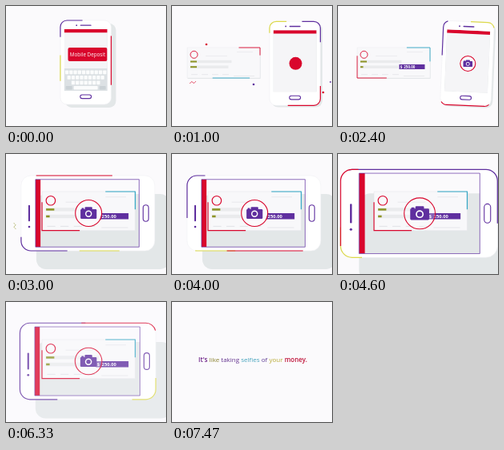
An HTML page with a canvas for the animation above (7.54 s loop, 200x150 px).

```html
<!DOCTYPE html>
<html lang="en">
<head>
<meta charset="utf-8">
<title>Mobile Deposit</title>
<style>
html, body { margin: 0; width: 100%; height: 100%; overflow: hidden; background: #fbfafc; }
canvas { display: block; width: 200px; height: 150px; }
</style>
</head>
<body>
<canvas id="stage"></canvas>
<script>
const LOOP = 7540, FPS = 15;
const BG = '#fbfafc', RED = '#d9062c', PURPLE = '#5f2f9f', YELLOW = '#dcd94a',
      TEAL = '#2fa5c4', OLIVE = '#8d9426', SHADE = '#e3e7e8', LINE = '#e4e4e8';
const FONT = '"Open Sans", "Noto Sans", sans-serif';

const canvas = document.getElementById('stage');
const ctx = canvas.getContext('2d');
const dpr = window.devicePixelRatio || 1;
canvas.width = 200 * dpr;
canvas.height = 150 * dpr;

const clamp = v => Math.min(1, Math.max(0, v));
const mix = (a, b, k) => a + (b - a) * k;
const part = (t, a, b) => clamp((t - a) / (b - a));
const ramp = (t, a, b) => { const k = part(t, a, b); return k * k * (3 - 2 * k); };
const glide = (t, a, b) => 1 - (1 - part(t, a, b)) ** 3;
const bump = (t, a, b) => Math.sin(Math.PI * part(t, a, b));

// Phone poses: top and end are the bezels, dx and dy the shadow offset.
const HOME = { x: 99.7, y: 70.5, len: 105, wid: 63.5, top: 11, end: 17, dx: 6, dy: 4, lens: 8, turn: 0 };
const SIDE = { ...HOME, x: 161.5, y: 72, dx: 2, dy: 2, lens: 9.5 };
const FLAT = { x: 102.4, y: 74, len: 167, wid: 94, top: 18, end: 19.5, dx: 19, dy: 23, lens: 16.5, turn: -Math.PI / 2 };
const NEAR = { ...FLAT, x: 101.3, y: 74.3, len: 196, wid: 110, top: 23, end: 22, dx: 23, dy: 30, lens: 19.4 };

function blend(a, b, k) {
  const out = {};
  for (const key in a) out[key] = mix(a[key], b[key], k);
  return out;
}
const flatness = t => ramp(t, 2.45, 2.97);
const nearness = t => ramp(t, 4.05, 4.55) - ramp(t, 5.7, 6.4);

function poseAt(t) {
  let p = blend(HOME, SIDE, ramp(t, .3, 1.2));
  p = blend(p, FLAT, flatness(t));
  p = blend(p, NEAR, nearness(t));
  p.turn += .05 * bump(t, 2.1, 2.55);
  return p;
}

// Where each coloured stroke starts on the phone outline, clockwise, at each beat.
const BEATS = [0, 1, 2.4, 3, 4.6, 5.6, 6.6];
const STROKES = [
  [PURPLE, -.08, .1, .85, .87, 1.17, 1.68, 2],
  [YELLOW, .75, .94, 1.08, 1.74, 1.94, 2.43, 2.7],
  [RED, .22, .41, .48, 1.19, 2, 2.11, 2.4]
];
function along(t, stops) {
  let i = 0;
  while (i < BEATS.length - 2 && t > BEATS[i + 1]) i++;
  return mix(stops[i], stops[i + 1], part(t, BEATS[i], BEATS[i + 1]));
}

function box(x, y, w, h, r, fill) {
  ctx.beginPath();
  ctx.roundRect(x, y, w, h, r);
  if (fill) { ctx.fillStyle = fill; ctx.fill(); }
}
function ring(x, y, r) {
  ctx.beginPath();
  ctx.arc(x, y, Math.max(0, r), 0, 7);
}
function disc(x, y, r, fill) {
  ring(x, y, r);
  ctx.fillStyle = fill;
  ctx.fill();
}
function stroke(color, width) {
  ctx.strokeStyle = color;
  ctx.lineWidth = width;
  ctx.stroke();
}
function text(str, x, y, size, color, weight = 400, align = 'left') {
  ctx.font = `${weight} ${size}px ${FONT}`;
  ctx.textAlign = align;
  ctx.fillStyle = color;
  ctx.fillText(str, x, y);
}
function faded(alpha, draw) {
  if (alpha <= 0) return;
  ctx.save();
  ctx.globalAlpha = alpha;
  draw();
  ctx.restore();
}
function placed(x, y, turn, scale, draw) {
  ctx.save();
  ctx.translate(x, y);
  ctx.rotate(turn);
  ctx.scale(scale, scale);
  draw();
  ctx.restore();
}
// Strokes one stretch of a rounded box; start and share are parts of its outline.
function trace(x, y, w, h, r, color, start, share, width) {
  const p = 2 * (w + h) - 8 * r + 2 * Math.PI * r;
  ctx.save();
  box(x, y, w, h, r);
  ctx.setLineDash([share * p, (1 - share) * p]);
  ctx.lineDashOffset = -(start - Math.floor(start)) * p;
  stroke(color, width);
  ctx.restore();
}

function drawCheck(t) {
  const k = flatness(t), w = 91, h = 38;
  const x = mix(-92, 24, glide(t, .35, 1.35));
  placed(mix(x, 45, k), mix(52, 47, k), 0, mix(1, 1.28, k), () => {
    box(.6, 1, w, h, 0, SHADE);
    box(0, 0, w, h, 0, '#f8f8fa');
    stroke(LINE, .4);

    ring(8.5, 8.8, 4.5);
    stroke(RED, .9);
    box(62, 5, 20, .6, 0, LINE);
    box(23, 10, 27, .6, 0, LINE);
    box(3.5, 15.8, 52, 3.4, 0, '#eaebed');
    box(3.5, 22.5, 48, 3.4, 0, '#eaebed');
    box(4, 16.5, 8, 2, 0, OLIVE);
    box(4, 23.2, mix(8, 3.5, ramp(t, 1.5, 2)), 2, 0, OLIVE);
    for (let i = 0; i < 4; i++) box(5 + i * 13, 33.5, 8, .6, 0, '#dadbe0');
    box(58, 35, 26, .4, 0, '#d2d2d8');

    const bar = 32 * ramp(t, 1.65, 2.05);
    if (bar > 0) {
      box(52.5, 21, bar, 5.9, 0, PURPLE);
      text('$', 53.8, 25.6, 4.6, '#fff', 700);
      text('250.00'.slice(0, Math.round(6 * part(t, 1.9, 2.3))), 58.3, 25.6, 4.5, '#fff', 700);
    }
    const run = ramp(t, 1, 2.3);
    trace(0, 0, w, h, 0, RED, mix(.25, .71, run), mix(.14, .25, run), .9);
    trace(0, 0, w, h, 0, TEAL, mix(.55, 1.24, run), .18, .9);
  });
}

function drawKeyboard(t, left, width, bottom) {
  const drop = 30 * ramp(t, .2, .6);
  const y = bottom - 28 + drop, pitch = width / 10.3;
  box(left, y, width, 28, 0, '#dce1e4');
  [10, 9, 7].forEach((n, row) => {
    for (let i = 0; i < n; i++)
      box(left + width / 2 + (i - n / 2) * pitch + .5, y + 2.5 + row * 6.5, pitch - 1, 4.7, .8, '#fbfcfc');
  });
  box(left + 2, y + 22, 8, 4.5, .8, '#cbd2d6');
  box(left + 12, y + 22, width - 24, 4.5, .8, '#fbfcfc');
  box(left + width - 10, y + 22, 8, 4.5, .8, '#cbd2d6');
}

function drawButton(t) {
  const k = ramp(t, .25, .75), w = mix(49, 16, k), h = mix(17, 16, k);
  const x = mix(2.3, .8, k), y = mix(-10, 0, k);
  box(x - w / 2, y - h / 2, w, h, mix(2, 8, k), RED);
  faded(1 - ramp(t, .15, .4), () => text('Mobile Deposit', x, y + 2.4, 6.3, '#fff', 400, 'center'));
}

function drawPhone(t, p) {
  const { wid: w, len: l, top, end } = p;
  const z = w / 63.5, r = w * .13, clear = flatness(t);
  const sw = w - 9.5, sl = l - top - end, sx = -sw / 2, sy = -l / 2 + top;

  ctx.beginPath();
  ctx.roundRect(-w / 2, -l / 2, w, l, r);
  ctx.rect(sx, sy, sw, sl);
  ctx.fillStyle = '#fff';
  ctx.fill('evenodd');
  box(-w / 2, -l / 2, w, l, r);
  stroke('#f0f0f3', .6);

  ctx.save();
  box(sx, sy, sw, sl, 0);
  ctx.clip();
  faded(1 - clear, () => box(sx, sy, sw, sl, 0, '#f5f5f7'));
  if (t < .6) drawKeyboard(t, sx, sw, sy + sl);
  if (t < 1.6) drawButton(t);
  box(sx, sy, sw, 4.2 * z, 0, RED);
  ctx.restore();
  faded(clear, () => {
    box(sx, sy, sw, sl, 0);
    stroke(PURPLE, .7);
  });

  const ear = -l / 2 + top * .56, key = l / 2 - end * .57;
  box(-7 * z, ear - .7 * z, 14 * z, 1.4 * z, .7 * z, PURPLE);
  disc(-11.5 * z, ear, .9 * z, PURPLE);
  box(-6.9 * z, key - 2.3 * z, 13.8 * z, 4.6 * z, 2.3 * z);
  stroke(PURPLE, 1.1);

  const shares = [mix(.14, .42, ramp(t, 4, 4.6)), .1, .19];
  STROKES.forEach(([color, ...stops], i) =>
    trace(-w / 2, -l / 2, w, l, r, color, along(t, stops), shares[i], 1.2));
}

function drawLens(t, p) {
  const x = p.x + .8, y = p.y, r = p.lens;
  const open = ramp(t, 1.6, 1.95), pop = ramp(t, 1.8, 2.15);
  if (open < 1) disc(x, y, r, RED);
  faded(1 - .75 * ramp(t, 4.05, 4.5), () => disc(x, y, (r - .6) * open, BG));
  ring(x, y, r);
  stroke(RED, 1.1);
  placed(x, y, 0, r / 18 * pop, () => {
    box(-11, -5.5, 22, 13, 1.3, PURPLE);
    box(-5, -8.5, 10, 5, 1.2, PURPLE);
    box(-9.5, -7, 3.2, 2.5, .4, PURPLE);
    disc(0, .8, 4.6, '#fff');
    disc(0, .8, 3, PURPLE);
  });
}

function squiggle(x, y, turn, color) {
  placed(x, y, turn, 1, () => {
    ctx.beginPath();
    for (let i = -4; i <= 4; i += .5) ctx.lineTo(i, Math.sin(i * 1.3));
    stroke(color, .8);
  });
}

function drawSparks(t) {
  const pop = bump(t, .75, 1.45), fly = 8 * (t - 1);
  if (pop > 0) {
    disc(43, 48 - fly, 1.5 * pop, RED);
    disc(102, 98 + fly, 1.5 * pop, PURPLE);
    disc(189 + fly, 108, 1.5 * pop, RED);
    disc(198, 95 + fly, pop, PURPLE);
  }
  faded(pop, () => squiggle(26, 95.5, 0, RED));
  faded(.7 * bump(t, 2.75, 3.35), () => squiggle(11, 90, Math.PI / 2, OLIVE));
}

const WORDS = [["It's", '#6b1f86', 600], ['like', '#8c8433'], ['taking', '#64348f'], ['selfies', '#45a3bd'],
  ['of', '#5b3a93'], ['your', '#b9ab36'], ['money.', '#bf1238', 600]];

function drawSlogan(t) {
  const size = 8, gap = 2.15;
  const widths = WORDS.map(([word, , weight = 400]) => {
    ctx.font = `${weight} ${size}px ${FONT}`;
    return ctx.measureText(word).width;
  });
  let x = 101 - (widths.reduce((a, b) => a + b) + gap * (WORDS.length - 1)) / 2;
  WORDS.forEach(([word, color, weight], i) => {
    faded(ramp(t - i * .06, 6.45, 6.75), () => text(word, x, 74.7, size, color, weight));
    x += widths[i] + gap;
  });
}

function draw(t) {
  ctx.setTransform(dpr, 0, 0, dpr, 0, 0);
  ctx.fillStyle = BG;
  ctx.fillRect(0, 0, 200, 150);
  const veil = ramp(t, 6.1, 6.65);
  if (veil < 1) {
    const p = poseAt(t);
    placed(p.x + p.dx, p.y + p.dy, p.turn, 1, () =>
      box(-p.wid / 2, -p.len / 2, p.wid, p.len, p.wid * .13, SHADE));
    drawCheck(t);
    placed(p.x, p.y, p.turn, 1, () => drawPhone(t, p));
    if (t >= 1.6) drawLens(t, p);
    drawSparks(t);
    faded(veil, () => box(0, 0, 200, 150, 0, BG));
  }
  drawSlogan(t);
}

const start = performance.now();
function tick() {
  const ms = (performance.now() - start) % LOOP;
  draw(Math.floor(ms * FPS / 1000 + .01) / FPS);
  requestAnimationFrame(tick);
}
tick();
</script>
</body>
</html>
```
